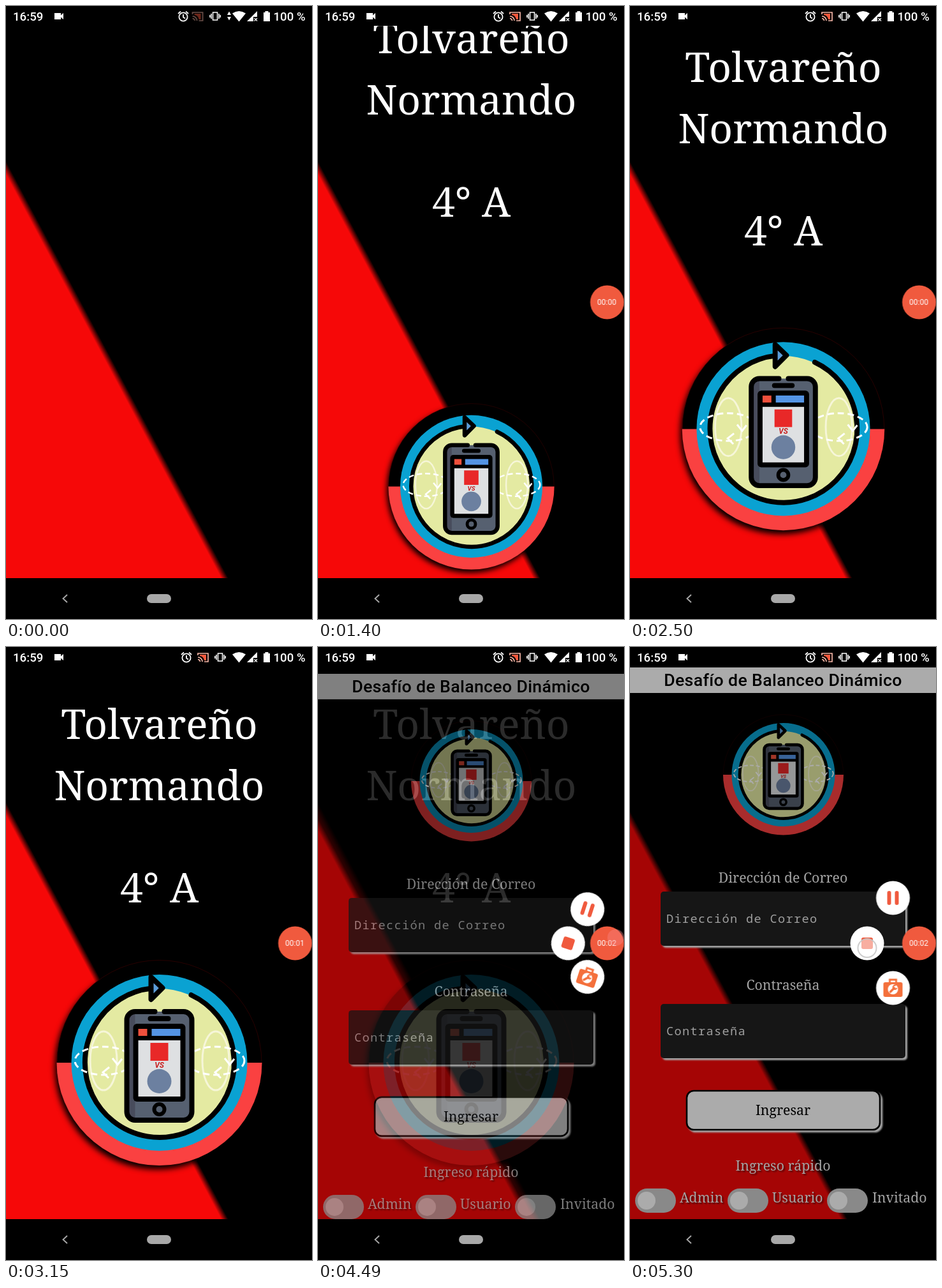
These frames come from a looping animation (480 px wide and 960 px high, 5350 ms). An HTML page:

```html
<!DOCTYPE html>
<html lang="es">
<head>
<meta charset="utf-8">
<title>Inicio</title>
<style>
  html, body { margin: 0; width: 100%; height: 100%; overflow: hidden; background: #000; }
  svg { display: block; width: 480px; height: 960px; }
  .serif { font: 21.33px "Noto Serif", serif; }
  .big { font-size: 64px; fill: #fff; }
  .mono { font: 18.67px "Noto Sans Mono", monospace; letter-spacing: 1.3px; fill: #ececec; }
  .head { font: 500 26.67px Roboto, sans-serif; letter-spacing: .33px; }
  .status { font: 500 18.67px Roboto, sans-serif; fill: #fff; }
  .clock { font: 12px Roboto, sans-serif; fill: #fff; }
  .mid { text-anchor: middle; }
  .pale { fill: #f4f4f4; }
  .glow { filter: drop-shadow(3px 3px 1px #f4f4f4); }
  .soft { filter: drop-shadow(2px 2px 1px #00000090); }
  .shade { filter: drop-shadow(-3px 6px 5px #000); }
  .line { fill: none; stroke: #fff; }

  .names, .lift, .grow, .logo, .shift, .arrows, .cast, .rec, .t0, .t1, .t2,
  .dim, .login, .item, .tap1, .tap2 { animation: 5350ms linear infinite both; }

  .names { animation-name: drop; }
  @keyframes drop {
    0% { transform: translateY(-133px); opacity: 0; }
    20.56% { opacity: 1; }
    34.4% { transform: translateY(-50px); }
    58.88%, 100% { transform: none; opacity: 1; }
  }
  .lift { animation-name: lift; }
  @keyframes lift {
    0% { transform: translate(240.5px, 867px); }
    49.35%, 100% { transform: translate(240.5px, 651px); }
  }
  .grow { animation-name: grow; }
  @keyframes grow {
    0% { transform: scale(0); animation-timing-function: cubic-bezier(.333, .95, .667, 1); }
    58.88%, 100% { transform: scale(1); }
  }
  .logo { animation-name: show; }
  @keyframes show { 0% { opacity: 0; } 25.6%, 100% { opacity: 1; } }

  .shift { animation-name: shift; }
  @keyframes shift {
    0% { transform: translateX(var(--dx)); }
    10% { transform: translateX(calc(var(--dx) * .3)); }
    20%, 100% { transform: none; }
  }
  .arrows { animation-name: out; }
  @keyframes out { 0%, 4% { opacity: 1; } 9%, 100% { opacity: 0; } }
  .cast { animation-name: cast; }
  @keyframes cast { 0% { opacity: .45; } 9%, 100% { opacity: 1; } }

  .rec { animation-name: rec; }
  @keyframes rec { 0%, 2% { opacity: 0; } 9%, 100% { opacity: 1; } }
  .t0, .t1, .t2 { animation-timing-function: step-end; }
  .t0 { animation-name: t0; }
  .t1 { animation-name: t1; }
  .t2 { animation-name: t2; }
  @keyframes t0 { 0% { opacity: 1; } 54%, 100% { opacity: 0; } }
  @keyframes t1 { 0% { opacity: 0; } 54% { opacity: 1; } 77%, 100% { opacity: 0; } }
  @keyframes t2 { 0% { opacity: 0; } 77%, 100% { opacity: 1; } }

  .dim { animation-name: dim; }
  @keyframes dim { 0%, 75.7% { opacity: 0; } 82.2%, 100% { opacity: .33; } }
  .login { animation-name: enter; }
  @keyframes enter {
    0% { transform: translateY(40px); opacity: 0; }
    82.5% { transform: translateY(40px); opacity: 0; animation-timing-function: cubic-bezier(.36, .66, .04, 1); }
    87.7%, 100% { transform: none; opacity: 1; }
  }
  .item { animation-name: fan; }
  @keyframes fan {
    0%, 78.5% { transform: translate(0, 0) rotate(72deg); opacity: 0; }
    79.5% { opacity: 1; }
    83.93% { transform: translate(calc(var(--x) * .75), calc(var(--y) * .75)) rotate(18deg); }
    87%, 100% { transform: translate(var(--x), var(--y)) rotate(0deg); opacity: 1; }
  }
  .tap1 { animation-name: tap1; }
  @keyframes tap1 { 0%, 75.7% { opacity: 0; } 77%, 82% { opacity: .7; } 83.9% { opacity: .4; } 86%, 100% { opacity: 0; } }
  .tap2 { animation-name: tap2; }
  @keyframes tap2 { 0%, 96.2% { opacity: 0; } 98%, 100% { opacity: .9; } }
</style>
</head>
<body>
<svg viewBox="0 0 480 960">
  <defs>
    <linearGradient id="edge" gradientUnits="userSpaceOnUse" x1="167.1" y1="576.8" x2="175.9" y2="572.1">
      <stop stop-color="#f60808"/><stop offset="1"/>
    </linearGradient>
    <clipPath id="page"><path d="M0 31H480V896H0z"/></clipPath>

    <g id="spin" fill="none" stroke-width="3">
      <ellipse rx="21" ry="46" stroke="#f6f6d8"/>
      <ellipse rx="45" ry="22" stroke="#fff" stroke-dasharray="10 6"/>
      <path d="M14 -4L22 6L29 -3M9 10L-1 18L8 27" stroke="#fff"/>
    </g>

    <g id="badge">
      <g class="shade">
        <circle r="160.5" stroke="#300" stroke-width=".8"/>
        <path d="M-161 0A161 161 0 0 0 161 0z" fill="#fa4141"/>
      </g>
      <circle r="138" fill="#0aa2d2"/>
      <circle r="116" fill="#e4eaa2"/>
      <path d="M50 -106A117 117 0 1 1 -12 -116.4" fill="none" stroke="#000" stroke-width="8" stroke-linecap="round"/>
      <path d="M-13 -134L5 -117L-13 -99z" fill="#5c9cd8" stroke="#000" stroke-width="8" stroke-linejoin="round"/>
      <use href="#spin" x="-87.5" y="-3"/>
      <use href="#spin" x="88.5" y="-3"/>
      <rect x="-51" y="-80" width="102" height="170" rx="13" fill="#566070"/>
      <path d="M-38 -80A13 13 0 0 0 -51 -67V77A13 13 0 0 0 -38 90z" fill="#484c5c"/>
      <path d="M-7 -80H-38A13 13 0 0 0 -51 -67V77A13 13 0 0 0 -38 90H38A13 13 0 0 0 51 77V-67A13 13 0 0 0 38 -80H8"
            fill="none" stroke="#000" stroke-width="8" stroke-linecap="round"/>
      <rect x="-18" y="-73" width="36" height="8" rx="4"/>
      <rect x="-41" y="-61" width="82" height="122" rx="6"/>
      <path d="M-33 -53H-19V-42H-33z" fill="#f0503c"/>
      <path d="M-12 -53H33V-42H-12z" fill="#5494e4"/>
      <path d="M-33 -35H33V53H-33z" fill="#dee0e2"/>
      <path d="M-14 -31H14V-3H-14z" fill="#e82828"/>
      <text class="mid" y="8" font-family="Roboto, sans-serif" font-size="12" font-weight="700" font-style="italic" fill="#c82020">VS</text>
      <circle cy="29" r="19" fill="#6c80a0"/>
      <circle cy="73" r="8" fill="#566070" stroke="#000" stroke-width="6"/>
    </g>

    <g id="toggle">
      <rect x="-18" y="-19" width="64" height="38" rx="19" fill="#ccc"/>
      <circle r="14" fill="#fff"/>
    </g>
  </defs>

  <rect width="480" height="960"/>
  <g clip-path="url(#page)">
    <rect y="31" width="480" height="865" fill="url(#edge)"/>
    <g class="names">
      <g class="serif mid">
        <text class="big" x="240.5" y="144">Tolvareño</text>
        <text class="big" x="240.5" y="240">Normando</text>
        <text class="big" x="240.5" y="400">4° A</text>
      </g>
    </g>
    <g class="logo"><g class="lift"><g class="grow"><use href="#badge"/></g></g></g>

    <g class="login">
      <rect y="32" width="480" height="864"/>
      <rect y="18" width="480" height="865" fill="url(#edge)" transform="translate(0 14)"/>
      <rect y="32" width="480" height="40" fill="#fff"/>
      <text class="head mid" x="240" y="61">Desafío de Balanceo Dinámico</text>
      <use href="#badge" transform="translate(240.5 200) scale(.587)"/>
      <g class="serif mid pale">
        <text class="soft" x="240" y="369">Dirección de Correo</text>
        <text class="soft" x="240" y="537">Contraseña</text>
        <text class="soft" x="240" y="820">Ingreso rápido</text>
      </g>
      <rect class="glow" x="48" y="383" width="384" height="85" rx="5" fill="#212121"/>
      <text class="mono" x="57" y="432">Dirección de Correo</text>
      <rect class="glow" x="48" y="559" width="384" height="85" rx="5" fill="#212121"/>
      <text class="mono" x="57" y="608">Contraseña</text>
      <rect class="glow" x="89" y="695" width="303" height="61" rx="11" fill="#fff" stroke="#000" stroke-width="2.6"/>
      <text class="serif mid" x="240" y="733">Ingresar</text>
      <use href="#toggle" x="26" y="867"/>
      <use href="#toggle" x="171" y="867"/>
      <use href="#toggle" x="327" y="867"/>
      <g class="serif pale">
        <text class="soft" x="78" y="870">Admin</text>
        <text class="soft" x="223" y="870">Usuario</text>
        <text class="soft" x="380" y="870">Invitado</text>
      </g>
    </g>
    <rect class="dim" y="31" width="480" height="865"/>
  </g>

  <!-- status bar -->
  <g class="status">
    <text x="11" y="23">16:59</text>
    <text x="419.5" y="23">100 %</text>
    <path d="M76 11H86V14.5L90 11V21L86 17.5V21H76z"/>
    <g class="shift" style="--dx:-5px">
      <g class="line" stroke-width="1.8">
        <circle cx="283" cy="17" r="6.6"/>
        <path d="M283 13V17.5L286 19.5M275 12L279 8.5M291 12L287 8.5"/>
      </g>
    </g>
    <g class="shift" style="--dx:-8.5px">
      <g class="cast">
        <path d="M304 12H314V21H311Q310 15 304 14z" fill="#f4583c"/>
        <path d="M301 13V10H317V23H311M301 16A7 7 0 0 1 308 23M301 19.5A3.5 3.5 0 0 1 304.5 23" fill="none" stroke="#f8b8a8" stroke-width="1.7"/>
      </g>
    </g>
    <g class="shift" style="--dx:-8px">
      <path class="line" d="M332.5 10H339.5V22H332.5zM330 12V20M342 12V20M327.8 14V18M344.2 14V18" stroke-width="1.6"/>
    </g>
    <path class="arrows" d="M347 14L350 8.5L353 14zM347 17L350 22.5L353 17z"/>
    <path d="M355 11.5Q365.5 4.5 376 11.5L365.5 24.5z"/>
    <path d="M394 8V17H388V24H378z"/>
    <path class="line" d="M389.5 19L394 23.5M394 19L389.5 23.5" stroke-width="1.3"/>
    <path d="M404 10H406.5V8H411.5V10H414V24H404z"/>
  </g>

  <!-- navigation bar -->
  <path d="M96 922L89.5 928L96 934" fill="none" stroke="#a8a8a8" stroke-width="1.9"/>
  <rect x="221" y="921" width="38" height="14" rx="7" fill="#a8a8a8"/>

  <!-- floating recorder -->
  <g transform="translate(453.5 464)">
    <g class="item" style="--x:-41px;--y:-71px">
      <circle r="26.5" fill="#fff"/>
      <path d="M-6 -8V8M6 -8V8" stroke="#f05a3e" stroke-width="6" stroke-linecap="round"/>
    </g>
    <g class="item" style="--x:-41px;--y:70px">
      <circle r="26.5" fill="#fff"/>
      <path d="M-5 -9V-13H5V-9" fill="none" stroke="#f4703c" stroke-width="3"/>
      <rect x="-15" y="-9" width="30" height="23" rx="3" fill="#f4703c"/>
      <circle cy="2" r="8" fill="#fff"/>
      <path d="M-4 6L2 0" stroke="#f4703c" stroke-width="3.4" stroke-linecap="round"/>
      <path d="M4.5 -4A3 3 0 1 0 6 0" fill="none" stroke="#f4703c" stroke-width="2"/>
    </g>
    <g class="item" style="--x:-81.5px;--y:0px">
      <circle r="26.5" fill="#fff"/>
      <rect x="-9" y="-9" width="18" height="18" rx="3" fill="#f05a3e"/>
    </g>
    <g class="rec">
      <circle r="26.5" fill="#f05a3e"/>
      <g class="clock mid">
        <text class="t0" x="-.5" y="4.3">00:00</text>
        <text class="t1" x="-.5" y="4.3">00:01</text>
        <text class="t2" x="-.5" y="4.3">00:02</text>
      </g>
    </g>
  </g>
  <circle class="tap1" cx="467" cy="455" r="13" fill="#f88888"/>
  <circle class="tap2" cx="372" cy="471.5" r="14.5" fill="#ffffff90" stroke="#c8c8c8" stroke-width="2"/>
</svg>
</body>
</html>
```
